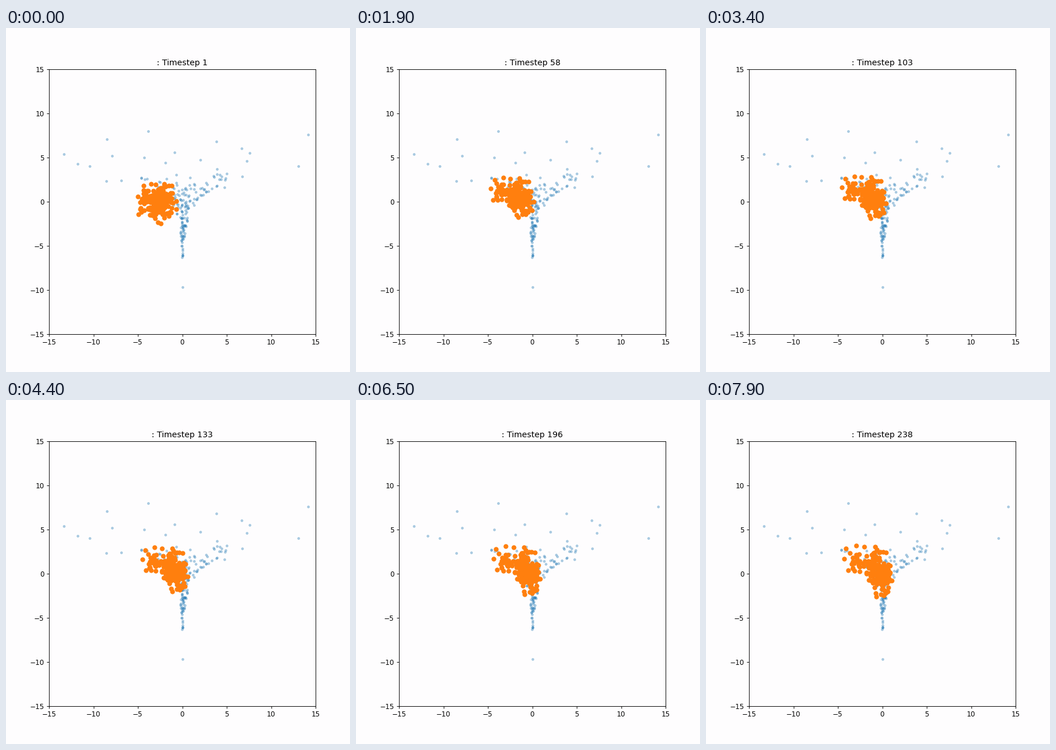
Animation, 600 px wide and 600 px high, one loop 8 s. Source, as a matplotlib script:

```python
import numpy as np
import matplotlib.pyplot as plt
from matplotlib.animation import FuncAnimation

FRAMES, INTERVAL, STRIDE = 80, 100, 3
PAPER = "#fefdfe"
rng = np.random.default_rng(11)

# Sparse far tail of the funnel; the rest is drawn at random.
TAIL = np.array([
    (-13.35, 5.4), (-11.8, 4.3), (-10.4, 4.05), (-8.5, 7.1), (-7.9, 5.2),
    (-8.55, 2.35), (-6.85, 2.4), (-4.3, 5), (-3.85, 8), (-1.9, 4.4),
    (-0.9, 5.6), (2, 4.75), (3.85, 6.85), (3.9, 3.7), (5, 3.2),
    (4.75, 1.6), (6.7, 6.05), (7.25, 4.6), (7.55, 5.55), (13.05, 4.05),
    (14.15, 7.6), (0, -9.65),
])


def funnel(n):
    """Height is normal, width grows as exp(height / 2)."""
    y = rng.normal(0, 2.9, 3 * n)
    y = y[(y > -7.5) & (y < 3.2)][:n]
    x = np.clip(rng.normal(0.25, 0.9, n), -1.2, 1.6) * np.exp(y / 2)
    return np.c_[x, y]


def cloud(n, reach=2.65):
    """Unit normal cloud without far outliers."""
    p = rng.normal(size=(2 * n, 2))
    return p[np.hypot(*p.T) < reach][:n].T


a, b = cloud(200)
start = np.array([a - 2.8, b])

# The cloud bends and stretches into the neck of the funnel.
end = np.array([
    -0.48 + 1.16 * a - 0.29 * b - 0.21 * a**2 + 0.16 * a * b
    - 0.19 * b**2 + 0.065 * a**2 * b,
    0.32 - 0.49 * a + 1.24 * b - 0.03 * a**2 + 0.19 * a * b
    + 0.08 * b**2 - 0.03 * a**2 * b,
])
lift = 1.6 - 0.65 * b


def particles(i):
    """Quick start, long slow-down; low particles rise before they sink."""
    t = i / (FRAMES - 1)
    sx, sy = t**0.52, t**0.42
    x = start[0] + sx * (end[0] - start[0])
    y = start[1] + sy * (end[1] - start[1]) + lift * sy * (1 - sy)
    return x, y


fig, ax = plt.subplots(figsize=(7, 7), dpi=600 / 7, facecolor=PAPER)
fig.subplots_adjust(left=0.125, right=0.9, bottom=0.11, top=0.88)
ax.set_facecolor(PAPER)
ax.set(xlim=(-15, 15), ylim=(-15, 15))
ax.plot(*np.vstack([TAIL, funnel(165)]).T, ".", color="C0", alpha=0.3)
dots, = ax.plot([], [], "o", color="C1")
title = ax.set_title("")


def update(i):
    dots.set_data(*particles(i))
    title.set_text(f": Timestep {STRIDE * i + 1}")
    return dots, title


anim = FuncAnimation(fig, update, frames=FRAMES, interval=INTERVAL,
                     repeat=True, repeat_delay=0, blit=False)
plt.show()
```
